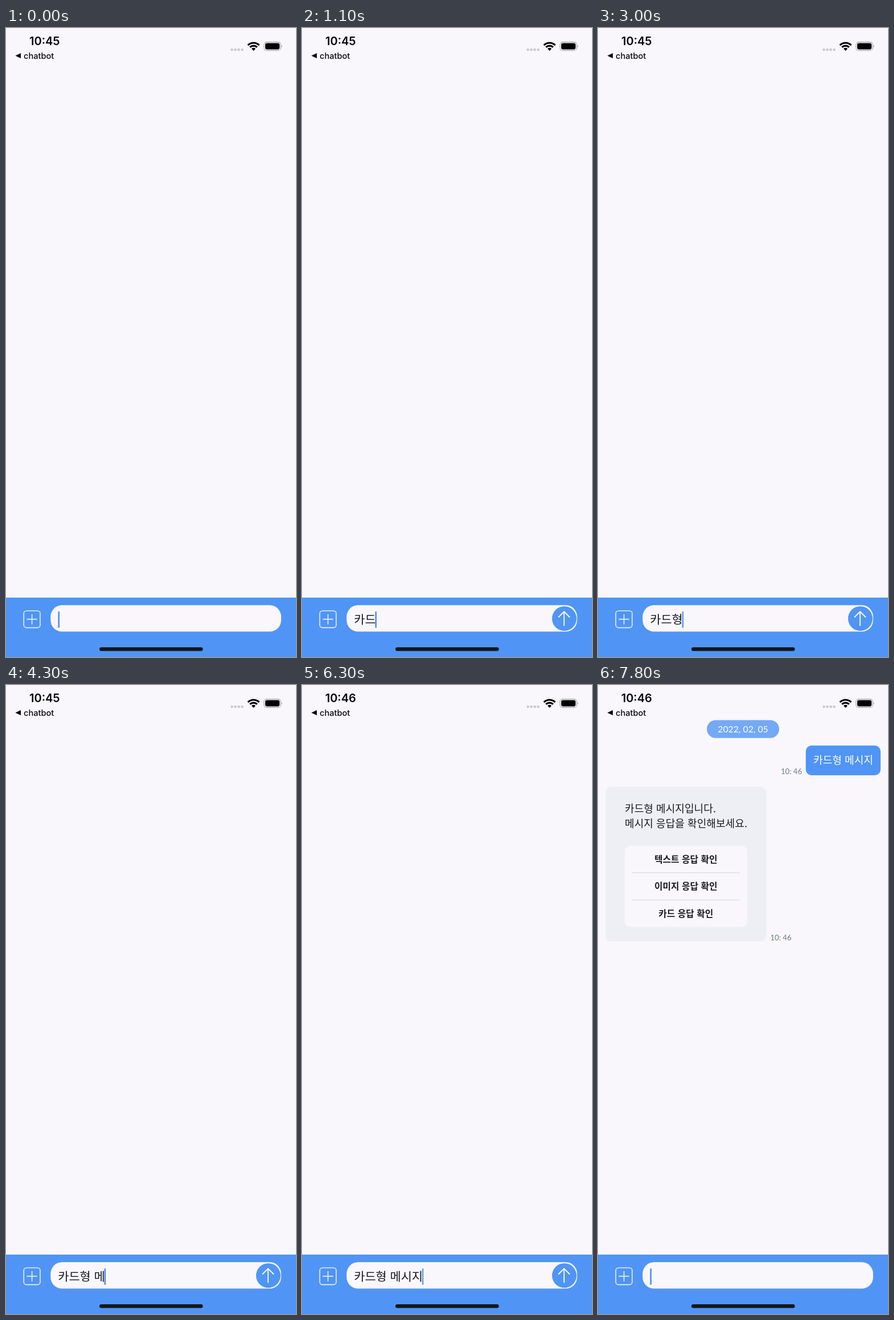
These frames come from a looping animation (509 px wide and 1101 px high, 8 s). An HTML page:

```html
<!DOCTYPE html>
<html lang="ko">
<head>
<meta charset="utf-8">
<title>Chat card message</title>
<style>
  html, body { margin: 0; width: 100%; height: 100%; overflow: hidden; background: #f9f7fc; }
  svg { display: block; width: 100%; height: 100%; }
  text { white-space: pre; font-family: "Noto Sans CJK KR", "Noto Sans KR", "Noto Sans CJK", sans-serif; }
  .ui { font-family: Inter, "Liberation Sans", sans-serif; fill: #050506; }
  .num { font-family: Lato, "Open Sans", sans-serif; }
  .stamp { font-size: 13.1px; fill: #6b7a8c; }
  .body { font-size: 18.1px; fill: #1a1b1f; }
  .option { font-size: 15.8px; font-weight: 700; fill: #1a1b1f; text-anchor: middle; }
</style>
</head>
<body>
<svg viewBox="0 0 509 1101" preserveAspectRatio="none">
  <rect width="509" height="1101" fill="#f9f7fc"/>

  <!-- status bar -->
  <text id="clock" class="ui" x="67.8" y="30" font-size="20" font-weight="600" text-anchor="middle">10:45</text>
  <path d="M16.3 48.5L26 44V53Z" fill="#050506"/>
  <text class="ui" x="31" y="53.5" font-size="14.6" font-weight="500">chatbot</text>
  <g fill="#c6c5ca">
    <circle cx="396.5" cy="38" r="2.2"/><circle cx="402.5" cy="38" r="2.2"/>
    <circle cx="408.5" cy="38" r="2.2"/><circle cx="414.5" cy="38" r="2.2"/>
  </g>
  <g fill="none" stroke="#000" stroke-width="3.2">
    <path d="M424.6 30.1A14 14 0 0 1 444.4 30.1"/>
    <path d="M428.2 33.7A8.9 8.9 0 0 1 440.8 33.7"/>
  </g>
  <path d="M434.5 40L431 36.3A5 5 0 0 1 438 36.3Z"/>
  <rect x="453" y="24.6" width="29.2" height="14.8" rx="4.5" fill="none" stroke="#a3a2a7" stroke-width="1.1"/>
  <rect x="455" y="26.6" width="25.2" height="10.8" rx="2.8"/>
  <path d="M483.6 29.6Q486 32 483.6 34.5Z" fill="#a3a2a7"/>

  <!-- conversation -->
  <g id="chat">
    <rect x="191" y="61.5" width="127" height="31.3" rx="15.6" fill="#73a9f7"/>
    <text class="num" x="254.5" y="82.8" font-size="15.8" fill="#fff" text-anchor="middle">2022, 02, 05</text>

    <rect x="364.7" y="106" width="131.3" height="52" rx="10" fill="#5095f5"/>
    <text x="378" y="138.4" font-size="18.1" fill="#fff">카드형 메시지</text>
    <text class="num stamp" x="321" y="156.3">10: 46</text>

    <rect x="13.2" y="178" width="282.4" height="271" rx="10" fill="#eeeff4"/>
    <text class="body" x="47" y="222.9">카드형 메시지입니다.</text>
    <text class="body" x="47" y="249">메시지 응답을 확인해보세요.</text>
    <rect x="47" y="281.5" width="214.7" height="142" rx="9" fill="#f9f7fc"/>
    <path d="M60 328.7H248.5M60 376.3H248.5" stroke="#d8dae0" stroke-width="1.3"/>
    <text class="option" x="154.2" y="311">텍스트 응답 확인</text>
    <text class="option" x="154.2" y="358.4">이미지 응답 확인</text>
    <text class="option" x="154.2" y="405.8">카드 응답 확인</text>
    <text class="num stamp" x="302.5" y="447.4">10: 46</text>
  </g>

  <!-- input bar -->
  <rect y="997" width="509" height="104" fill="#5095f5"/>
  <g fill="none" stroke="#e3edfd" stroke-width="1.6">
    <rect x="31.2" y="1020.2" width="28.8" height="29.4" rx="4.5"/>
    <path d="M36.6 1034.9H54.6M45.6 1025.9V1043.9"/>
  </g>
  <rect x="78.3" y="1010.3" width="404.6" height="46.2" rx="20" fill="#f9f7fc"/>
  <text id="typed" x="91.3" y="1043" font-size="20.8" fill="#17181b"></text>
  <rect id="caret" y="1021.4" width="2.6" height="28.4" fill="#4f8fee"/>
  <g id="send">
    <circle cx="460.4" cy="1033.7" r="21.5" fill="#5095f5"/>
    <path d="M460 1046.5V1021.5M450 1031.5L460 1021.5L470 1031.5" fill="none" stroke="#fff" stroke-width="1.8"/>
  </g>
  <rect x="164" y="1084" width="181.5" height="6.6" rx="3.3" fill="#151618"/>
</svg>

<script>
const LOOP = 8000, CLOCK_TICK = 4600, SENT = 6400;

// [start ms, value]
const typing = [
  [0, ""], [700, "ㅋ"], [800, "카"], [900, "칻"], [1000, "카드"],
  [2300, "카듷"], [2400, "카드혀"], [2500, "카드형"], [3600, "카드형 "],
  [4200, "카드형 ㅁ"], [4300, "카드형 메"], [4500, "카드형 멧"],
  [4600, "카드형 메시"], [4700, "카드형 메싲"], [4800, "카드형 메시지"],
  [SENT, ""]
];
const blink = [
  [0, 1], [100, .5], [200, 0], [400, .5], [500, 1],
  [1500, .8], [1600, .4], [1700, 0], [1900, .5], [2000, 1],
  [3000, .9], [3100, 0], [3400, .5], [3500, 1],
  [4100, .7], [4200, 1], [5300, .5], [5400, 0], [5700, .5], [5800, 1],
  [6300, .85], [6400, .65], [6500, 0], [6700, .5], [6800, 1],
  [7300, .8], [7400, .4], [7500, 0], [7700, .5], [7800, 1]
];

const el = id => document.getElementById(id);
const clock = el("clock"), chat = el("chat"), typed = el("typed"),
      caret = el("caret"), send = el("send");
const at = (steps, t) => steps.findLast(s => s[0] <= t)[1];
const show = (node, on) => node.setAttribute("visibility", on ? "visible" : "hidden");
const setText = (node, s) => { if (node.textContent !== s) node.textContent = s; };

function draw(t) {
  const text = at(typing, t);
  setText(typed, text);
  setText(clock, t < CLOCK_TICK ? "10:45" : "10:46");
  const end = text ? 91.3 + typed.getComputedTextLength() : 92.6;
  caret.setAttribute("x", end - 1.2);
  caret.setAttribute("opacity", at(blink, t));
  show(send, text);
  show(chat, t >= SENT);
}

function tick() {
  draw(performance.now() % LOOP);
  requestAnimationFrame(tick);
}
tick();
</script>
</body>
</html>
```
